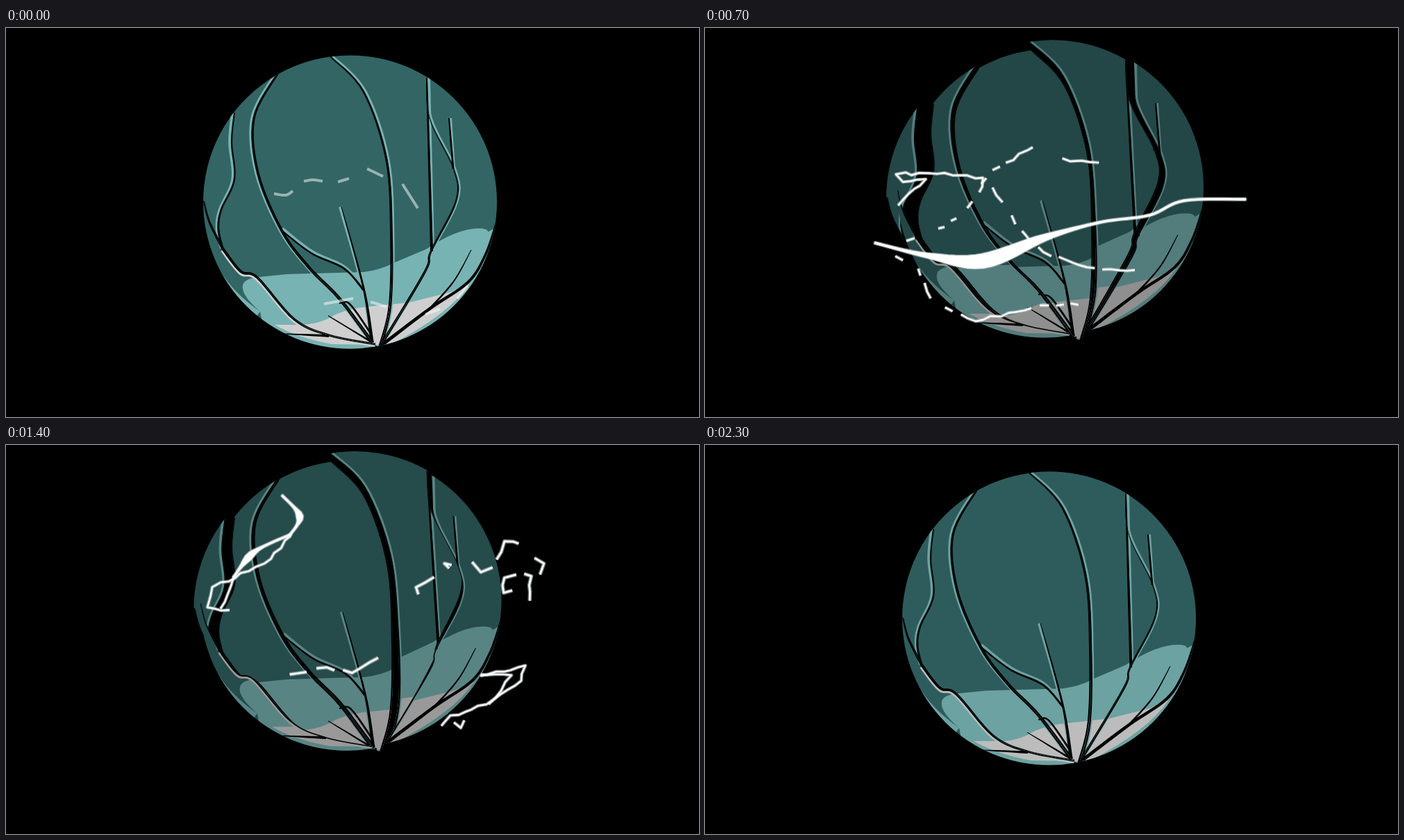
Animation of 998 by 561 pixels, one loop 2400 ms. Source, as an HTML page with a canvas:

```html
<!DOCTYPE html>
<html>
<head>
<meta charset="utf-8">
<title>Cracked orb</title>
<style>
html, body { margin: 0; width: 100%; height: 100%; overflow: hidden; background: #000; }
canvas { display: block; }
</style>
</head>
<body>
<canvas id="stage" width="998" height="561"></canvas>
<script>
const ctx = document.getElementById('stage').getContext('2d');
const LOOP = 2400, STEP = 100;
const clamp = x => Math.min(1, Math.max(0, x));
const smooth = x => x * x * (3 - 2 * x);
const mix = (a, b, u) => a + (b - a) * u;
const noise = n => { const s = Math.sin(n * 12.9898) * 43758.5453; return s - Math.floor(s); };

// Motion of the whole loop
const rise = t => Math.sin(Math.PI * t / LOOP) ** 1.6;
const spread = t => smooth(clamp(t / 400)) * (1 - smooth(clamp((t - 700) / 1600)));
const dip = (t, at, depth) => depth * Math.exp(-(((t - at) / 200) ** 2));
const glow = t => 1 - .27 * Math.sqrt(Math.sin(Math.PI * t / LOOP)) - dip(t, 400, .32) - dip(t, 900, .1);

const points = text => text.match(/\d+ \d+/g).map(p => p.split(' ').map(Number));

// Soft curve through a few key points
function curve(text) {
  const p = points(text), out = [];
  for (let i = 0; i < p.length - 1; i++) {
    const [a, b, c, d] = [p[i - 1] || p[i], p[i], p[i + 1], p[i + 2] || p[i + 1]];
    for (let u = 0; u < 1; u += .125)
      out.push([0, 1].map(k => mix(b[k], c[k], smooth(u))
        + (c[k] - a[k]) / 2 * u * (1 - u) ** 2 - (d[k] - b[k]) / 2 * u * u * (1 - u)));
  }
  return [...out, p[p.length - 1]];
}
function trace(list, path = new Path2D()) {
  list.forEach(([x, y], i) => i ? path.lineTo(x, y) : path.moveTo(x, y));
  return path;
}
// Outline of a line whose width changes along the way
function ribbon(line, width, dx = 0, dy = 0) {
  const near = [], far = [], last = line.length - 1;
  line.forEach(([x, y], i) => {
    const a = line[Math.max(0, i - 1)], b = line[Math.min(last, i + 1)];
    const angle = Math.atan2(b[1] - a[1], b[0] - a[0]), w = width(i / last) / 2;
    const ox = -Math.sin(angle) * w, oy = Math.cos(angle) * w;
    near.push([x + dx + ox, y + dy + oy]);
    far.unshift([x + dx - ox, y + dy - oy]);
  });
  const path = trace([...near, ...far]);
  path.closePath();
  return path;
}

// Each crack: black line, with a lit edge beside it where a shift is given
const cracks = [];
function crack(text, from, to, shift, pale = false) {
  const line = curve(text);
  const lit = shift && ribbon(line, u => mix(4, 2, u), ...shift);
  cracks.push({ black: ribbon(line, u => mix(from, to, u)), lit, pale });
  return line;
}
const left = crack('329 122 325 165 329 218 310 262 306 290 312 318', 2, 3, [-3, 0]);
const hem = crack('285 250 293 280 312 318', 2, 4);
const low = crack('312 318 338 351 362 360 415 420 465 443 532 456', 4, 3, [-1, 3], true);
const second = crack('391 66 357 130 363 210 397 292 436 345 480 390 528 454', 3, 5, [-3, 0]);
const third = crack('467 41 515 92 548 190 555 300 553 400 539 459', 2, 5, [3, 0]);
const right = crack('606 72 610 130 645 204 648 250 612 322 603 352 539 459', 1, 4, [2, 0]);
crack('606 72 609 180 613 322', 2, 4, [3, 0]);
crack('483 258 515 375 527 452', 1, 5, [-2, 0]);
crack('397 292 440 325 487 347 515 378', 2, 3, [1, -3]);
crack('480 397 495 398 525 440', 2, 3);
crack('464 415 525 452', 1, 3);
crack('400 441 465 444', 1, 4);
crack('638 130 644 203', 2, 3, [2, 0]);
crack('539 459 610 405 665 367 690 328 706 282', 5, 3);
crack('610 405 645 365 670 320', 3, 1);

const back = line => [...line].reverse();
function shard(parts, lift, dx, dy, turn = 0) {
  return { path: trace(parts.flat()), lift, dx, dy, turn };
}
const shards = [
  shard([left, back(hem), points('260 220 260 100 329 100')], 20, -23, 8),
  shard([left, low, back(second), points('400 30 300 60')], 18, 0, 0),
  shard([second, points('537 461'), back(third), points('460 20')], 22, 3, 6),
  shard([third, back(right), points('600 40 467 20')], 31, -1, 0, -2.2),
  shard([right, points('537 480 720 480 720 40 606 30')], 27, 11, -3),
  shard([hem, low, points('532 480 250 480 250 250')], 23, -7, 0)
];

const orb = new Path2D();
orb.arc(495.5, 251, 211.5, 0, 7);
const band = new Path2D(`M366 409Q338 385 341 371Q343 361 365 359L405 355 515 352Q540 349 560 338
  L605 319Q650 289 680 289Q694 289 694 294L720 280 720 480 380 480Z
  M308 349Q325 380 366 409L350 430Z`);
const base = new Path2D(`M387 428L430 428Q455 426 475 413Q497 404 520 402L580 396 640 381 668 368
  Q640 412 553 457L470 456Q420 447 387 428Z`);

function drawOrb(t) {
  const tint = (...rgb) => `rgb(${rgb.map(c => Math.round(c * glow(t)))})`;
  const mid = tint(121, 180, 180), light = tint(208, 208, 208);
  const paint = (path, color) => { ctx.fillStyle = color; ctx.fill(path); };
  for (const s of shards) {
    ctx.save();
    ctx.translate(469 + s.dx * spread(t), 42 + s.dy * spread(t) - s.lift * rise(t));
    ctx.rotate(s.turn * rise(t) * Math.PI / 180);
    ctx.translate(-469, -42);
    ctx.clip(s.path);
    paint(orb, tint(51, 102, 102));
    ctx.clip(orb);
    paint(band, mid);
    paint(base, light);
    for (const c of cracks) if (c.lit) paint(c.lit, c.pale ? light : mid);
    for (const c of cracks) paint(c.black, '#000');
    ctx.restore();
  }
}

// Jagged line along key points; "broken" drops random parts of it
function jagged(text, broken = false) {
  const p = points(text), path = new Path2D();
  let seed = p[0][0], from = p[0];
  path.moveTo(...from);
  for (const to of p.slice(1)) {
    const n = Math.max(1, Math.round(Math.hypot(to[0] - from[0], to[1] - from[1]) / 12));
    for (let i = 1; i <= n; i++) {
      const stray = i < n ? 5 : 0;
      const x = mix(from[0], to[0], i / n) + (noise(seed++) - .5) * stray;
      const y = mix(from[1], to[1], i / n) + (noise(seed++) - .5) * stray;
      if (broken && noise(seed++) < .4) path.moveTo(x, y);
      else path.lineTo(x, y);
    }
    from = to;
  }
  return path;
}
const broken = text => jagged(text, true);
// Main stroke that swells around one place
const swell = (text, at, size) =>
  ribbon(curve(text), u => 1 + size * Math.exp(-(((u - at) / .13) ** 2)));

const sweep = {
  fat: [swell('245 310 320 328 400 336 490 302 570 280 640 270 690 249 778 247', .3, 18)],
  thin: [jagged('278 256 318 218 285 222 275 211 345 209 400 216 395 237'),
    broken('392 237 414 205 472 172'), broken('502 188 578 196 616 213'),
    broken('290 307 345 287 385 250'), broken('414 230 447 283 487 323 550 345 619 349'),
    broken('274 329 307 347 325 390 390 423 482 400 548 398')]
};
const strike = {
  fat: [swell('272 259 350 250 400 256 480 282 525 320 593 357 644 346', .27, 15)],
  thin: [jagged('430 272 450 287 490 303 507 293 470 275'),
    broken('518 205 527 180 555 172 605 216 620 272'), broken('530 300 565 324'),
    jagged('713 320 668 322 657 340'),
    broken('690 328 671 345 697 375 676 402 597 414 570 385 506 376')]
};
const curls = {
  fat: [],
  thin: [jagged('270 209 265 195 277 188'), jagged('297 170 315 167 325 190'),
    jagged('330 200 345 206 356 193'), jagged('290 208 281 211 283 242'),
    jagged('300 209 315 213 316 232 305 229'), jagged('382 197 391 195 385 201'),
    jagged('404 212 427 225 424 234'), broken('465 305 508 333 540 326 587 335')]
};
const loops = {
  fat: [swell('398 73 423 103 408 131', .5, 7), swell('410 129 358 154 328 190', .6, 7)],
  thin: [jagged('410 131 372 171 297 205 290 234 322 238'), jagged('328 190 309 236'),
    jagged('627 405 640 390 692 374 742 340 748 318 683 333'),
    jagged('684 331 728 332 695 374'), jagged('645 400 655 408 660 397')]
};
const embers = {
  fat: [swell('633 74 645 66 660 65', .6, 10), swell('523 73 533 70 545 71', .5, 6)],
  thin: [jagged('538 73 605 80 635 75 645 61 660 65'),
    jagged('753 289 756 275 788 284 793 270 829 257 845 275 838 291'),
    jagged('793 270 820 261 845 279'), jagged('616 499 623 511'),
    jagged('635 517 675 533 695 522'), jagged('638 519 658 519 681 531')]
};
const wisps = ['386 239 403 241 413 235', '429 221 442 219 456 221', '478 222 494 217', '520 203 543 214',
  '571 225 593 260', '458 398 500 390', '525 395 548 402', '604 413 625 405', '650 390 665 372']
  .map(w => trace(curve(w)));

// A later strike is the earlier one flipped and enlarged
const flip = new DOMMatrix([-1.137, 0, 0, 1.143, 1076, -52]);
const plain = new DOMMatrix();

function spark(shape, map = plain) {
  ctx.setTransform(map);
  for (const [color, width] of [['rgba(190,200,200,.6)', 5], ['#fff', 2.4]]) {
    ctx.strokeStyle = ctx.fillStyle = color;
    ctx.lineWidth = width;
    for (const path of shape.thin) ctx.stroke(path);
    for (const path of shape.fat) { ctx.stroke(path); ctx.fill(path); }
  }
  ctx.resetTransform();
}
function faint(map = plain) {
  ctx.setTransform(map);
  ctx.strokeStyle = 'rgba(255,255,255,.5)';
  ctx.lineWidth = 4;
  for (const path of wisps) ctx.stroke(path);
  ctx.resetTransform();
}
const show = [
  [0, 100, () => faint()],
  [100, 300, () => spark(sweep, flip.inverse())],
  [300, 500, () => spark(strike)],
  [500, 600, () => faint(flip)],
  [600, 800, () => spark(sweep)],
  [800, 1000, () => spark(strike, flip)],
  [800, 1200, () => spark(curls)],
  [1300, 1600, () => spark(curls, flip)],
  [1300, 1700, () => spark(loops)],
  [1800, 2000, () => spark(embers)]
];

function draw(t) {
  ctx.fillStyle = '#000';
  ctx.fillRect(0, 0, 998, 561);
  ctx.lineJoin = 'round';
  drawOrb(t);
  for (const [from, to, act] of show) if (t >= from && t < to) act();
}

const start = performance.now();
function tick() {
  const t = (performance.now() - start) % LOOP;
  draw(Math.floor(t / STEP) * STEP);
  requestAnimationFrame(tick);
}
tick();
</script>
</body>
</html>
```
